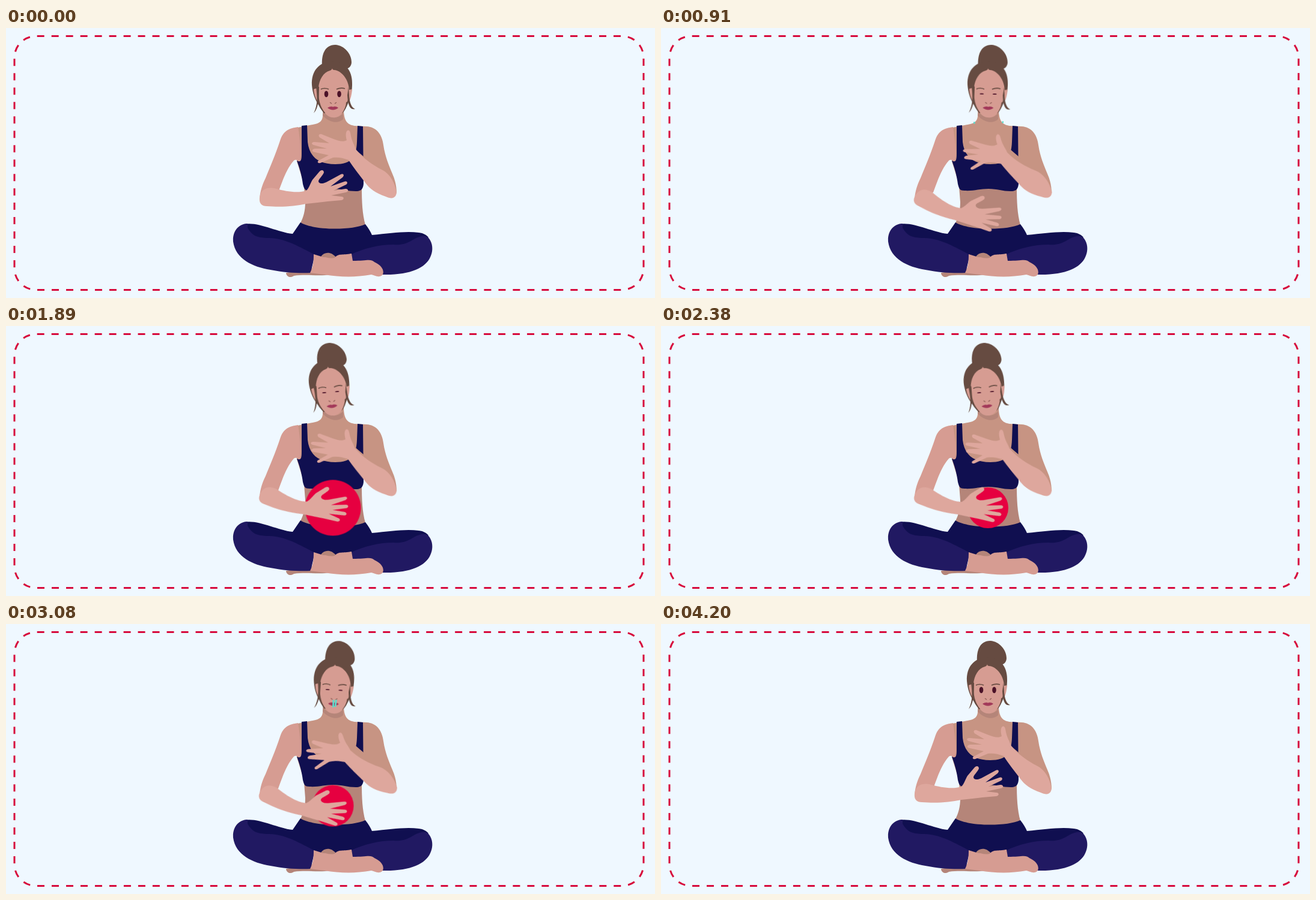
Recreate the animation shown at these times as an HTML page. Size 1080 px wide and 450 px high, loop 4270 ms.

```html
<!DOCTYPE html>
<html lang="en">
<head>
<meta charset="utf-8">
<title>Breathing exercise</title>
<style>
html, body { margin: 0; width: 100%; height: 100%; overflow: hidden; background: #eff8ff; }
svg { display: block; width: 100%; height: 100%; }
.light { fill: #d69c92; }
.hand { fill: #dea79d; }
.mid { fill: #c79483; }
.shade { fill: #b58579; }
.navy { fill: #100f50; }
.indigo { fill: #211962; }
.hair { fill: #664b41; }
.brow { fill: none; stroke: #664b41; stroke-width: 1.7; }

.head, .lower, .upper, .ball, .eye, .air { animation: 4270ms linear infinite; }
.head { animation-name: head; transform-origin: 545px 150px; }
.lower { animation-name: lower; transform-origin: 432px 284px; }
.upper { animation-name: upper; transform-origin: 636px 268px; }
.ball { animation-name: ball; transform-origin: 544px 303px; fill: #e60040; }
.eye { animation-name: eye; transform-box: fill-box; transform-origin: center; fill: #4b1228; }
.air { animation-name: air; fill: none; stroke: #5cdccb; stroke-width: 2.8; }

@keyframes head {
  0%, 98.36%, 100% { transform: rotate(0deg); }
  13% { transform: rotate(1.8deg); }
  21.31% { transform: rotate(1.1deg); }
  34.43% { transform: rotate(-2.7deg); }
  47% { transform: rotate(-5.6deg); }
  55.74% { transform: rotate(-5.2deg); }
  72.13% { transform: rotate(3.3deg); }
  85.25% { transform: rotate(1.9deg); }
}
@keyframes lower {
  0% { transform: rotate(0deg); animation-timing-function: ease-in-out; }
  13.1% { transform: rotate(25deg); }
  21.31% { transform: rotate(24.5deg); }
  34.43% { transform: rotate(21.4deg); }
  45.5% { transform: rotate(17.6deg); }
  55.74% { transform: rotate(18.4deg); }
  68% { transform: rotate(23.5deg); }
  72.13% { transform: rotate(23deg); }
  85.25% { transform: rotate(18deg); }
  91.8% { transform: rotate(17.5deg); animation-timing-function: ease-in-out; }
  98.36%, 100% { transform: rotate(0deg); }
}
@keyframes upper {
  0% { transform: rotate(0deg); animation-timing-function: ease-in-out; }
  13.1% { transform: rotate(-5.8deg); }
  21.31% { transform: rotate(-5.4deg); }
  34.43% { transform: rotate(-2.7deg); }
  45.5% { transform: rotate(-1.2deg); }
  55.74% { transform: rotate(-2deg); }
  72.13% { transform: rotate(-8.3deg); }
  78.7% { transform: rotate(-8.8deg); }
  85.25% { transform: rotate(-8.3deg); }
  91.8% { transform: rotate(-7.4deg); animation-timing-function: ease-in-out; }
  98.36%, 100% { transform: rotate(0deg); }
}
@keyframes ball {
  0%, 21.31% { transform: scale(0); }
  34.43% { transform: scale(.78); }
  40% { transform: scale(1); }
  52.46% { transform: scale(.8); }
  55.74% { transform: scale(.68); }
  63.9% { transform: scale(.58); }
  72.13% { transform: scale(.69); }
  78.7% { transform: scale(.85); }
  85.25% { transform: scale(.93); }
  91.8% { transform: scale(1); }
  98.36%, 100% { transform: scale(0); }
}
@keyframes eye {
  0%, 98.36%, 100% { transform: scaleY(1); }
  9%, 92% { transform: scaleY(.2); }
}
@keyframes air {
  0%, 20.6% { stroke-dasharray: 0 300; stroke-dashoffset: 0; }
  21.31% { stroke-dasharray: 5 300; stroke-dashoffset: 0; }
  30.4% { stroke-dasharray: 62 300; stroke-dashoffset: 0; }
  34.43% { stroke-dasharray: 63 300; stroke-dashoffset: -17; }
  41%, 70.3% { stroke-dasharray: 0 300; stroke-dashoffset: -100; }
  72.13% { stroke-dasharray: 26 300; stroke-dashoffset: -71; }
  85.25% { stroke-dasharray: 57 300; stroke-dashoffset: 0; }
  90.2%, 100% { stroke-dasharray: 0 300; stroke-dashoffset: 0; }
}
</style>
</head>
<body>
<svg viewBox="0 0 1080 450">
  <rect width="1080" height="450" fill="#eff8ff"/>
  <rect x="14" y="13.5" width="1047" height="423" rx="36" fill="none" stroke="#d70a3c" stroke-width="3"
    pathLength="2880" stroke-dasharray="12 12" stroke-dashoffset="-1.7"/>

  <!-- torso -->
  <path class="shade" d="M496 264L498 290C498 305 495 315 490 325L500 340H590L598 328C593 310 592 290 592 264Z"/>
  <path class="mid" d="M527 135C528 150 527 157 515 160L485 166L484 222L497 264H592L595 215L628 275H650C650 265 648 254 643 243C637 228 631 215 628 195C626 178 617 165 600 164L580 163C568 161 562 155 562 135Z"/>
  <path class="shade" d="M528 139C535 150 552 153 561 142V152C553 160 538 158 527 146Z"/>
  <path class="navy" d="M492 163L501 162L502 190C505 215 520 227 548 227C575 227 583 215 584 190L585 163L594 164L595 260C594 271 588 272 582 272C568 272 560 268 545 268C530 268 520 272 505 271C497 271 496 268 494 260C492 245 489 235 484 221C490 224 492 222 492 210Z"/>
  <path class="mid" d="M582 203L596 215L630 240L620 262L574 214Z"/>
  <path class="light" d="M486 165C470 167 461 172 456 188C448 212 440 230 432 250C426 262 422 275 422 288L453 274C460 255 467 234 479 221C485 217 486 225 490 221C492 205 489 185 486 165Z"/>

  <!-- legs -->
  <path class="shade" d="M466 408C466 413 472 418 479 413C500 410 520 414 540 411L515 400Z"/>
  <path class="navy" d="M490 324C510 337 575 338 598 327C603 333 607 340 609 345C640 342 665 338 687 341C695 342 700 345 703 349L640 375L577 384H510L410 360L395 327C420 322 450 340 477 343Z"/>
  <path class="indigo" d="M402 326C385 327 377 340 378 356C382 385 410 398 440 403C465 408 490 409 507 408L514 378C485 363 465 351 438 350C414 350 409 344 402 333Z"/>
  <path class="indigo" d="M573 378C596 367 620 361 645 361C668 363 675 352 688 348C696 345 703 347 706 354C711 363 710 374 706 382C698 400 672 412 627 411L600 400L577 390Z"/>
  <path class="light" d="M512 377L525 381L549 382L575 376L577 388C600 388 607 384 613 390C628 397 630 407 626 412C620 417 613 412 608 411C580 416 555 415 530 411L506 408C511 399 512 389 512 377Z"/>
  <path class="shade" d="M524 381C530 372 542 373 549 382C540 386 532 381 524 381Z"/>
  <path class="light" d="M547 383C553 375 560 379 575 376V386H545Z"/>

  <g class="head">
    <path class="hair" d="M526 62C525 45 530 28 548 28C563 29 575 43 575 57C575 62 572 66 569 67L545 80Z"/>
    <path class="hair" d="M543 55C520 57 508 72 509 95C510 108 514 120 522 131L529 142L559 142C570 130 576 110 576 95C577 75 568 56 543 55Z"/>
    <path class="light" d="M512 102L518 100L518 122Q513 114 512 102ZM571 103L576 102Q575 115 571 123Z"/>
    <path class="light" d="M543 67C542 70 541 70 539 71C528 74 521 86 520 100C520 120 522 129 530 140C537 152 552 152 559 142C566 132 570 120 571 104C571 87 559 71 546 70C544 70 543 69 543 67Z"/>
    <path class="hair" d="M516 98C518 115 519 128 512 142C519 135 521 122 521 98ZM570 98C571 122 573 131 581 135C573 137 569 130 568 112ZM518 121L530 142Q521 134 518 121ZM569 122Q567 135 559 143Q566 132 566 124Z"/>
    <path class="brow" d="M524 102Q530 99 537 102M550 102Q557 99 564 101"/>
    <ellipse class="eye" cx="533" cy="110" rx="3.3" ry="5.3"/>
    <ellipse class="eye" cx="554.5" cy="110" rx="3.3" ry="5.3"/>
    <path d="M539 124L542 126M550 124L547 126" fill="none" stroke="#8a5a52" stroke-width="1.2"/>
    <path d="M535 133C539 131 542 130 544 131.5C547 130 550 131 553 133C548 137.5 540 137.5 535 133Z" fill="#a33a5a"/>
  </g>

  <circle class="ball" cx="544" cy="303" r="50"/>

  <path class="hand upper" d="M650 275C648 285 640 285 632 281C615 275 605 268 598 258C588 245 578 232 570 220C560 216 552 215 544 216L523 225C518 226 517 222 522 220L537 212L514 207C508 206 509 202 514 201L534 201L512 195C508 194 508 190 513 190L538 192L523 183C519 180 520 176 525 177L545 185C555 189 562 190 567 187C565 180 565 173 568 171C572 169 573 174 574 180C576 190 580 195 582 202C595 218 610 228 625 236C640 243 648 260 650 275Z"/>
  <path class="hand lower" d="M422 283C421 292 425 297 434 297C460 299 480 297 500 293C512 292 525 290 535 289L558 287C563 286 563 281 558 281L541 279L565 274C571 273 570 268 565 268L545 271L566 261C570 258 567 254 563 256L540 264L560 249C564 245 561 242 557 244L533 257C527 260 520 260 520 255C521 251 527 246 529 241C529 236 524 236 521 240L510 253C506 260 504 267 500 271C485 276 465 272 450 268C435 264 424 268 422 283Z"/>

  <path class="air" pathLength="100" d="M520 158C535 157 542 150 544.5 138L545 125"/>
  <path class="air" pathLength="100" d="M570 157C557 156 550 150 548 138L549.5 125"/>
</svg>
</body>
</html>
```
